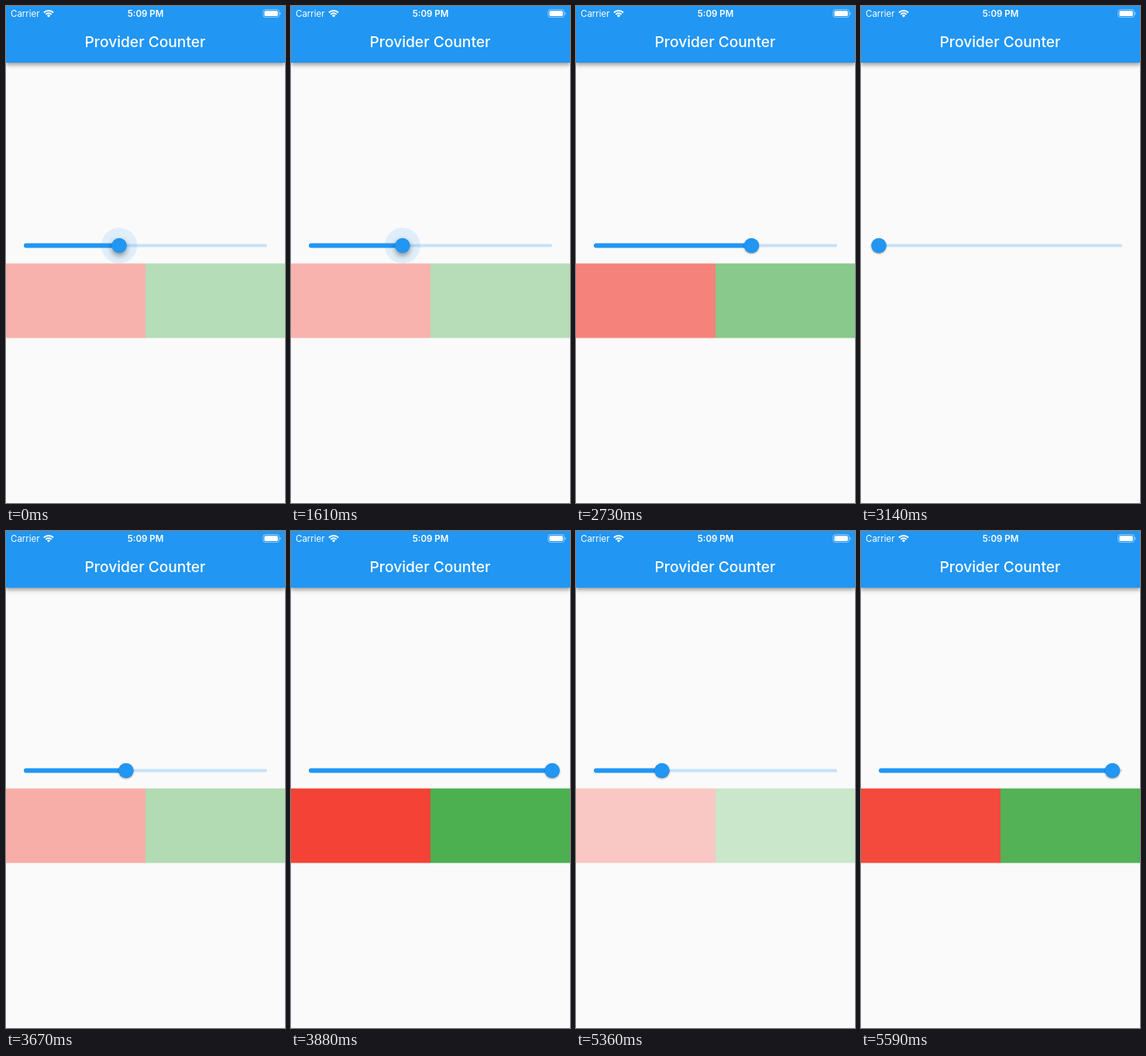
An HTML page with a canvas that plays this animation: 360 by 640 pixels, repeating every 5.64 s.

```html
<!DOCTYPE html>
<html lang="en">
<head>
<meta charset="utf-8">
<title>Provider Counter</title>
<style>
  html, body { margin: 0; width: 100%; height: 100%; overflow: hidden; background: #fafafa; }
  canvas { display: block; width: 360px; height: 640px; }
</style>
</head>
<body>
<canvas id="stage" width="360" height="640"></canvas>
<script>
const ctx = document.getElementById('stage').getContext('2d');
const LOOP = 5640;
const BLUE = '33,150,243', RED = '244,67,54', GREEN = '76,175,80';
const TRACK = { left: 23, right: 337, y: 308.5 };

// [start in ms, slider value, press strength]
const STEPS = [
  [0, 0.392, 1],
  [1610, 0.385, 1], [1720, 0.47, 0.5], [1830, 0.68, 0], [1940, 0.9, 0], [2050, 1, 0],
  [2610, 0.87, 0], [2730, 0.648, 0], [2830, 0.4, 0], [2930, 0.19, 0], [3040, 0.05, 0], [3140, 0, 0],
  [3560, 0.12, 0], [3670, 0.42, 0], [3770, 0.78, 0], [3880, 1, 0],
  [4600, 0.685, 0], [4700, 0.27, 0], [4820, 0, 0],
  [5360, 0.28, 0], [5480, 0.7, 0], [5590, 0.96, 0]
];

const rgba = (rgb, alpha = 1) => `rgba(${rgb},${alpha})`;

function box(x, y, w, h, color, radius = 0) {
  ctx.fillStyle = color;
  ctx.beginPath();
  ctx.roundRect(x, y, w, h, radius);
  ctx.fill();
}

function disc(x, y, radius, color) {
  ctx.fillStyle = color;
  ctx.beginPath();
  ctx.arc(x, y, radius, 0, Math.PI * 2);
  ctx.fill();
}

function withShadow(offset, blur, alpha, draw) {
  ctx.save();
  ctx.shadowColor = `rgba(0,0,0,${alpha})`;
  ctx.shadowOffsetY = offset;
  ctx.shadowBlur = blur;
  draw();
  ctx.restore();
}

function label(text, x, y, font, align) {
  ctx.font = `${font} Inter, sans-serif`;
  ctx.textAlign = align;
  ctx.textBaseline = 'alphabetic';
  ctx.fillStyle = '#fff';
  ctx.fillText(text, x, y);
}

function drawWifi(x, y) {
  const from = -Math.PI * 0.75, to = -Math.PI * 0.25;
  ctx.strokeStyle = ctx.fillStyle = '#fff';
  ctx.lineWidth = 1.9;
  for (const radius of [5.3, 8.6]) {
    ctx.beginPath();
    ctx.arc(x, y, radius, from, to);
    ctx.stroke();
  }
  ctx.beginPath();
  ctx.moveTo(x, y);
  ctx.arc(x, y, 3.1, from, to);
  ctx.fill();
}

function drawBattery() {
  ctx.strokeStyle = 'rgba(255,255,255,0.5)';
  ctx.lineWidth = 1;
  ctx.beginPath();
  ctx.roundRect(331.8, 4.7, 20.6, 9.8, 2.6);
  ctx.stroke();
  box(333.4, 6.2, 17.4, 6.8, '#fff', 1.5);
  box(353.4, 8, 1.2, 3.4, 'rgba(255,255,255,0.5)', 0.6);
}

function drawAppBar() {
  const bar = () => box(0, 0, 360, 73, rgba(BLUE));
  withShadow(2, 4, 0.2, bar);
  withShadow(4, 5, 0.14, bar);
  withShadow(1, 9, 0.12, bar);
  label('Carrier', 6, 14, '400 11.5px', 'left');
  label('5:09 PM', 180, 14, '600 11.5px', 'center');
  label('Provider Counter', 179.5, 53, '500 19.2px', 'center');
  drawWifi(55, 14.6);
  drawBattery();
}

function drawSlider(value, press) {
  const { left, right, y } = TRACK;
  const x = left + (right - left) * value;
  box(x, y - 1.92, right - x, 3.84, rgba(BLUE, 0.24), [0, 1.92, 1.92, 0]);
  box(left, y - 2.88, x - left, 5.76, rgba(BLUE), [2.88, 0, 0, 2.88]);
  if (press) disc(x, y, 23 * press, rgba(BLUE, 0.12));
  const thumb = () => disc(x, y, 9.6, rgba(BLUE));
  withShadow(1 + 3 * press, 2.5 + 4.5 * press, 0.3, thumb);
  withShadow(1 + press, 2 + 5 * press, 0.15, thumb);
}

function render(now) {
  const time = now % LOOP;
  const [, value, press] = STEPS.findLast(([start]) => start <= time);
  box(0, 0, 360, 640, '#fafafa');
  drawAppBar();
  drawSlider(value, press);
  box(0, 331.6, 180, 96, rgba(RED, value));
  box(180, 331.6, 180, 96, rgba(GREEN, value));
}

const origin = performance.now();
function tick() {
  render(performance.now() - origin);
  requestAnimationFrame(tick);
}
tick();
</script>
</body>
</html>
```
